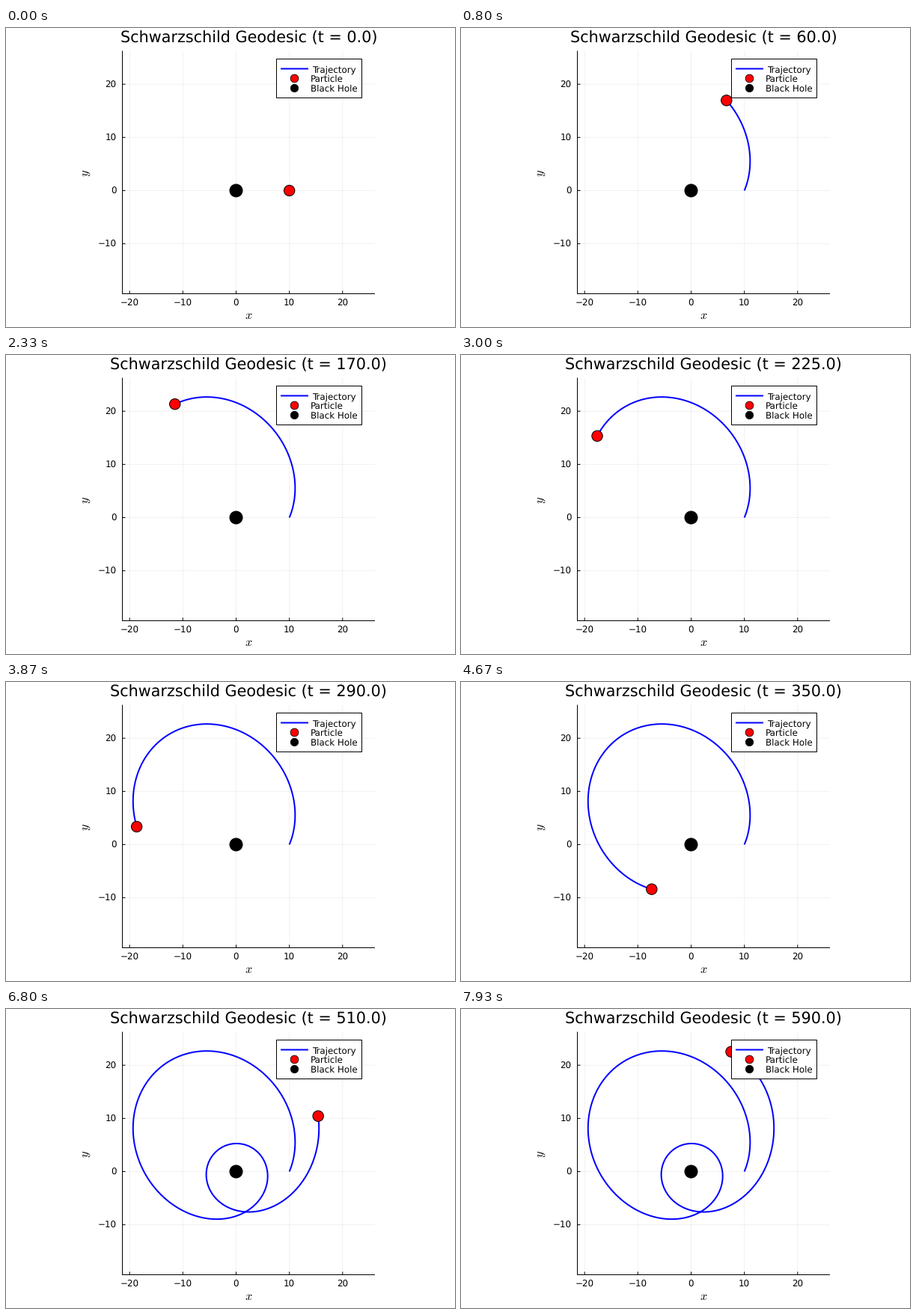
These frames come from a looping animation (600x400 px, 8 s). A matplotlib script:

```python
import numpy as np
import matplotlib.pyplot as plt
from matplotlib.animation import FuncAnimation
from matplotlib.patches import Circle, Rectangle

W, H, DPI = 600, 400, 100
FRAMES, LOOP_MS = 120, 8000
DT, SUB = 5.0, 20              # proper time per frame, integration steps per frame
R0, UR0, L = 10.0, 0.1597, 3.7805   # start radius, radial velocity, angular momentum (M = 1)
CX, CY, SCALE = 307.5, 217.5, 7.115  # origin and unit length in pixels
LEFT, RIGHT, TOP, BOTTOM = 155.5, 493, 30.5, 355.5
PX = 72 / DPI                  # one pixel in points

plt.rcParams["font.family"] = "DejaVu Sans"
plt.rcParams["mathtext.fontset"] = "cm"
plt.rcParams["text.hinting"] = "none"


def geodesic(state):
    r, ur, _ = state
    accel = -1 / r**2 + L**2 / r**3 - 3 * L**2 / r**4
    return np.array([ur, accel, L / r**2])


def solve():
    """Integrate the orbit with RK4 and return its pixel coordinates."""
    h = DT / SUB
    state = np.array([R0, UR0, 0.0])
    path = [state]
    for _ in range(FRAMES * SUB):
        k1 = geodesic(state)
        k2 = geodesic(state + h / 2 * k1)
        k3 = geodesic(state + h / 2 * k2)
        k4 = geodesic(state + h * k3)
        state = state + h / 6 * (k1 + 2 * k2 + 2 * k3 + k4)
        path.append(state)
    r, _, phi = np.array(path).T
    return CX + SCALE * r * np.cos(phi), CY - SCALE * r * np.sin(phi)


xs, ys = solve()

fig = plt.figure(figsize=(W / DPI, H / DPI), dpi=DPI, facecolor="white")
ax = fig.add_axes([0, 0, 1, 1])
ax.set_xlim(0, W)
ax.set_ylim(H, 0)
ax.axis("off")


def segment(x, y, color="black", width=1.0, z=3, **kw):
    return ax.plot(x, y, color=color, lw=width * PX, zorder=z, snap=False,
                   solid_capstyle="butt", **kw)[0]


def label(x, y, text, size=11.86, z=3, **kw):
    return ax.text(x, y, text, fontsize=size * PX, color="black", zorder=z, **kw)


def dot(x, y, radius, color, z, edge=1.0):
    return ax.add_patch(Circle((x, y), radius, facecolor=color, edgecolor="black",
                               lw=edge * PX, zorder=z))


def number(v):
    return str(v).replace("-", "\u2212")


# Grid, ticks and axes
for v in range(-20, 21, 10):
    x = CX + SCALE * v
    segment([x, x], [TOP, BOTTOM], z=1, alpha=0.055)
    segment([x, x], [BOTTOM - 4, BOTTOM])
    label(x, 372, number(v), ha="center", va="baseline")
for v in range(-10, 21, 10):
    y = CY - SCALE * v
    segment([LEFT, RIGHT], [y, y], z=1, alpha=0.055)
    segment([LEFT, LEFT + 4], [y, y])
    label(147.4, y + 4.3, number(v), ha="right", va="baseline")
segment([LEFT, LEFT], [TOP, BOTTOM + 0.5])
segment([LEFT - 0.5, RIGHT], [BOTTOM, BOTTOM])
label(323.8, 389, "$x$", size=16.3, ha="center", va="baseline")
label(107, 193.5, "$y$", size=16.3, ha="center", va="center", rotation=90)
title = label((LEFT + RIGHT) / 2, 19, "", size=20.75, ha="center", va="baseline")

# Moving parts and the central body
trail = segment([], [], color="blue", width=2, z=4, solid_joinstyle="round")
particle = dot(xs[0], ys[0], 7.2, "red", 5)
dot(CX, CY, 8.5, "black", 6)

# Legend
ax.add_patch(Rectangle((361.5, 41.5), 114, 52, facecolor="white", snap=False,
                       edgecolor="black", lw=PX, zorder=7))
segment([367, 404], [54.5, 54.5], color="blue", width=2, z=8)
dot(385.5, 67.5, 5.4, "red", 8, edge=0.8)
dot(385.5, 80.5, 5.2, "black", 8, edge=0.8)
label(408.7, 59, "Trajectory", z=8)
label(407, 72, "Particle", z=8)
label(407, 85, "Black Hole", z=8)


def update(k):
    n = k * SUB
    trail.set_data(xs[:n + 1], ys[:n + 1])
    particle.center = xs[n], ys[n]
    title.set_text(f"Schwarzschild Geodesic (t = {DT * k:.1f})")
    return trail, particle, title


anim = FuncAnimation(fig, update, frames=FRAMES, init_func=lambda: update(0),
                     interval=LOOP_MS / FRAMES, repeat=True, repeat_delay=0)
plt.show()
```
